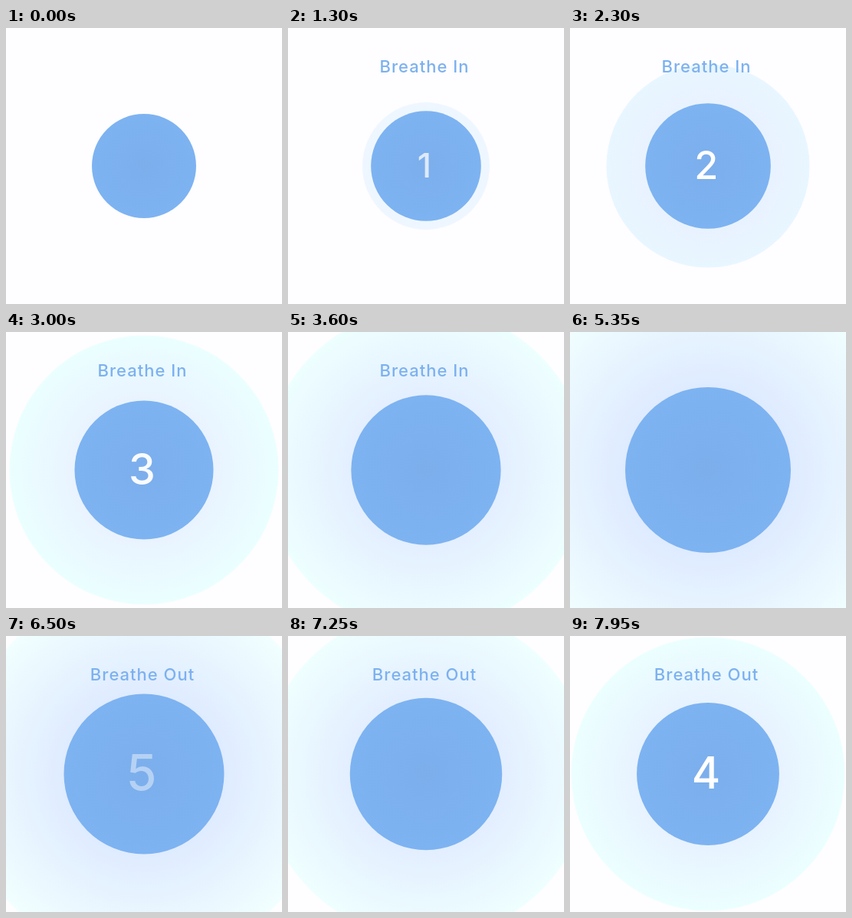
Recreate the animation shown at these times as an HTML page. Size 360x360 px, loop 8 s.

```html
<!DOCTYPE html>
<html lang="en">
<head>
<meta charset="utf-8">
<title>Breathing guide</title>
<style>
  html, body { margin: 0; width: 100%; height: 100%; overflow: hidden; background: #fefdff; }
  svg { display: block; width: 100%; height: 100%; }
  text { font-family: Inter, "Open Sans", sans-serif; font-weight: 500; text-anchor: middle; }
</style>
</head>
<body>
<svg viewBox="0 0 360 360">
  <defs>
    <radialGradient id="coreFill">
      <stop offset="0" stop-color="#7caeec"/>
      <stop offset="1" stop-color="#7db3f1"/>
    </radialGradient>
    <radialGradient id="haloFill">
      <stop id="inner" offset=".4"/>
      <stop id="outer" offset="1"/>
    </radialGradient>
  </defs>
  <circle id="halo" cx="180" cy="180" fill="url(#haloFill)"/>
  <circle id="core" cx="180" cy="180" fill="url(#coreFill)"/>
  <text id="title" x="178" y="58" font-size="22" letter-spacing="1" fill="#7cb1ef"></text>
  <text id="count" fill="#fff"></text>
</svg>
<script>
const LOOP = 8000;
const BEATS = 6; // one beat for the title, then five counts
const IN = { label: "Breathe In", start: 300, length: 5000, small: 64, count: n => n };
const OUT = { label: "Breathe Out", start: 5300, length: 6300, small: 40, count: n => 6 - n };
const CORE = [68, 108], HALO_MAX = 262;

// Halo tints by how full the breath is
const LEVELS = [0.1, 0.35, 0.56, 0.88];
const INNER = [[237, 245, 255], [232, 240, 255], [232, 240, 255], [222, 234, 255]];
const OUTER = [[238, 247, 255], [232, 246, 255], [235, 255, 255], [241, 255, 255]];

const $ = id => document.getElementById(id);
const halo = $("halo"), core = $("core"), title = $("title"), count = $("count");
const inner = $("inner"), outer = $("outer");

const ramp = (x, a, b) => Math.min(1, Math.max(0, (x - a) / (b - a)));
const mix = (a, b, k) => a + (b - a) * k;

function tint(colors, level) {
  let i = 0;
  while (i < LEVELS.length - 2 && level > LEVELS[i + 1]) i++;
  const k = ramp(level, LEVELS[i], LEVELS[i + 1]);
  return `rgb(${colors[i].map((c, j) => Math.round(mix(c, colors[i + 1][j], k)))})`;
}

function draw(t) {
  const phase = t < OUT.start ? IN : OUT;
  const p = ramp(t, phase.start, phase.start + phase.length);
  const eased = (1 - Math.cos(Math.PI * p)) / 2;
  const level = phase === IN ? eased : 1 - eased;
  const r = mix(...CORE, level);
  const beat = p * BEATS;
  const n = Math.min(BEATS - 1, Math.floor(beat));
  const part = beat - n;

  core.setAttribute("r", r);
  halo.setAttribute("r", mix(phase.small, HALO_MAX, level));
  halo.setAttribute("opacity", phase === IN ? ramp(beat, 1, 1.15) : 1);
  inner.setAttribute("stop-color", tint(INNER, level));
  outer.setAttribute("stop-color", tint(OUTER, level));

  title.textContent = phase.label;
  title.setAttribute("opacity", ramp(beat, 0.06, 0.5) * (1 - ramp(beat, 5.08, 5.7)));

  count.textContent = n ? phase.count(n) : "";
  count.setAttribute("x", 180 - 0.028 * r);
  count.setAttribute("y", 180 + 0.205 * r);
  count.setAttribute("font-size", 0.615 * r);
  count.setAttribute("opacity", ramp(part, 0.06, 0.25) * (1 - ramp(part, 0.7, 0.84)));
}

const origin = performance.now();
function tick() {
  draw((performance.now() - origin) % LOOP);
  requestAnimationFrame(tick);
}
tick();
</script>
</body>
</html>
```
